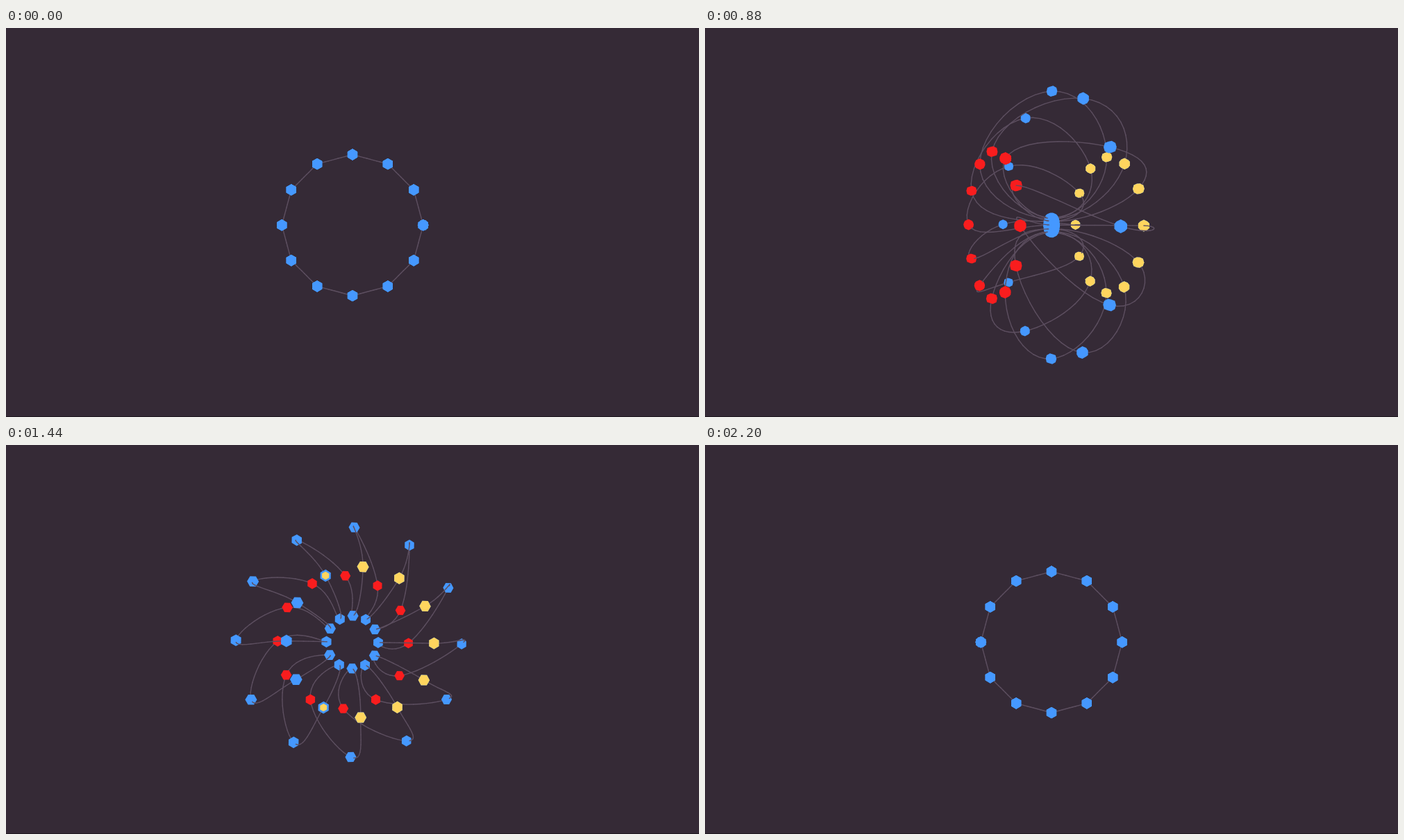
Animation of 998x561 px, one loop 2760 ms. Source, as an HTML page with a canvas:

```html
<!DOCTYPE html>
<html lang="en">
<head>
<meta charset="utf-8">
<title>Coil</title>
<style>
  html, body { margin: 0; width: 100%; height: 100%; overflow: hidden; background: #352a36; }
  canvas { display: block; }
</style>
</head>
<body>
<canvas id="stage" width="998" height="561"></canvas>
<script>
const ctx = document.getElementById('stage').getContext('2d');
const LOOP = 2760, FRAME = 40;
const CX = 499, CY = 284.3, RING = 101.8, CAMERA = 990, NODE = 8.2;
const TURNS = 12, COUNT = TURNS * 4, STEPS = 12, TENSION = 0.76;
const BLUE = '#4598ff', RED = '#f91d1e', YELLOW = '#ffd55e', LINE = '#5d4f60';
const { PI, sin, cos, min, max } = Math;
const rad = d => d * PI / 180;
const clamp = v => min(1, max(0, v));
const ease = (t, start, length) => (1 - cos(PI * clamp((t - start) / length))) / 2;

// Spin in degrees, passed through smoothly
const spinKeys = [[360, 0], [720, -19.7], [880, -59.6], [1160, -140.5],
                  [1440, -240.9], [1920, -348.5], [2200, -360]];

function spinAt(t) {
  const last = spinKeys.length - 1;
  if (t <= spinKeys[0][0]) return 0;
  if (t >= spinKeys[last][0]) return spinKeys[last][1];
  const i = spinKeys.findIndex(k => k[0] > t) - 1;
  const slope = j => j <= 0 || j >= last ? 0 :
    (spinKeys[j + 1][1] - spinKeys[j - 1][1]) / (spinKeys[j + 1][0] - spinKeys[j - 1][0]);
  const [t0, v0] = spinKeys[i], [t1, v1] = spinKeys[i + 1];
  return hermite((t - t0) / (t1 - t0), v0, v1, slope(i) * (t1 - t0), slope(i + 1) * (t1 - t0));
}

function hermite(u, a, b, da, db) {
  const u2 = u * u, u3 = u2 * u;
  return (2 * u3 - 3 * u2 + 1) * a + (3 * u2 - 2 * u3) * b
       + (u3 - 2 * u2 + u) * da + (u3 - u2) * db;
}

function hull(points) {
  points.sort((p, q) => p[0] - q[0] || p[1] - q[1]);
  const half = list => {
    const out = [];
    for (const p of list) {
      while (out.length > 1) {
        const [a, b] = out.slice(-2);
        if ((b[0] - a[0]) * (p[1] - a[1]) - (b[1] - a[1]) * (p[0] - a[0]) > 0) break;
        out.pop();
      }
      out.push(p);
    }
    return out.slice(0, -1);
  };
  return [...half(points), ...half([...points].reverse())];
}

function fillShape(points, color) {
  ctx.fillStyle = color;
  ctx.beginPath();
  points.forEach(p => ctx.lineTo(p[0], p[1]));
  ctx.fill();
}

function draw(t) {
  const turn = PI * ease(t, 345, 1306);
  const tube = RING * (t < 1020 ? ease(t, 410, 595) : 1 - ease(t, 1030, 980));
  const spin = rad(spinAt(t));
  const twist = min(1, tube / 60);
  const yellowEdge = max(640 - (t - 740) * 1.6, 440 + (t - 1440) * 4);
  const redOn = t >= 520 && t < 1720;

  const project = ([x, y, z]) => {
    const depth = x * sin(turn) + z * cos(turn);
    const s = CAMERA / (CAMERA - depth);
    return [CX + (x * cos(turn) - z * sin(turn)) * s, CY + y * s, depth];
  };

  const coilPoint = k => {
    k = (k + COUNT) % COUNT;
    const a = spin - Math.floor(k / 4) * 2 * PI / TURNS;
    const r = RING - tube * sin(k * PI / 2);
    return [r * cos(a), r * sin(a), tube * cos(k * PI / 2)];
  };

  const nodeShape = (c, rot) => {
    const points = [];
    for (const lat of [-PI / 2, -PI / 4, 0, PI / 4, PI / 2])
      for (let j = 0; j < 6; j++) {
        const b = j * PI / 3 + PI / 2 + rot, r = NODE * cos(lat);
        points.push(project([c[0] + r * cos(b), c[1] + r * sin(b), c[2] + NODE * sin(lat)]));
      }
    return hull(points);
  };

  const items = [];
  const addNode = (k, rot) => {
    const c = coilPoint(k), [x, y, depth] = project(c), shape = nodeShape(c, rot);
    items.push({ depth: depth + 5, paint() {
      const kind = k % 4;
      fillShape(shape, kind === 0 && redOn ? RED : BLUE);
      if (kind === 2 && x > yellowEdge) {
        const s = min(1, ((x - yellowEdge) / 75) ** 0.3);
        fillShape(shape.map(p => [x + (p[0] - x) * s, y + (p[1] - y) * s]), YELLOW);
      }
    } });
  };
  for (let k = 0; k < COUNT; k++) addNode(k, spin + Math.floor(k / 4) * PI / 6 * twist);
  addNode(COUNT, spin + PI / 6 * (1 - twist));

  for (let k = 0; k < COUNT; k++) {
    const [p, a, b, q] = [-1, 0, 1, 2].map(d => coilPoint(k + d));
    let from = project(a);
    for (let j = 1; j <= STEPS; j++) {
      const start = from;
      const to = project([0, 1, 2].map(n =>
        hermite(j / STEPS, a[n], b[n], (b[n] - p[n]) * TENSION, (q[n] - a[n]) * TENSION)));
      items.push({ depth: (start[2] + to[2]) / 2, paint() {
        ctx.beginPath();
        ctx.moveTo(start[0], start[1]);
        ctx.lineTo(to[0], to[1]);
        ctx.stroke();
      } });
      from = to;
    }
  }

  ctx.fillStyle = '#352a36';
  ctx.fillRect(0, 0, 998, 561);
  ctx.strokeStyle = LINE;
  ctx.lineWidth = 1.4;
  ctx.lineCap = 'round';
  items.sort((m, n) => m.depth - n.depth).forEach(item => item.paint());
  ctx.fillStyle = '#1f1920';
  ctx.fillRect(0, 560, 998, 1);
}

const begin = performance.now();
function tick() {
  const t = (performance.now() - begin) % LOOP;
  draw(Math.floor(t / FRAME) * FRAME);
  requestAnimationFrame(tick);
}
tick();
</script>
</body>
</html>
```
